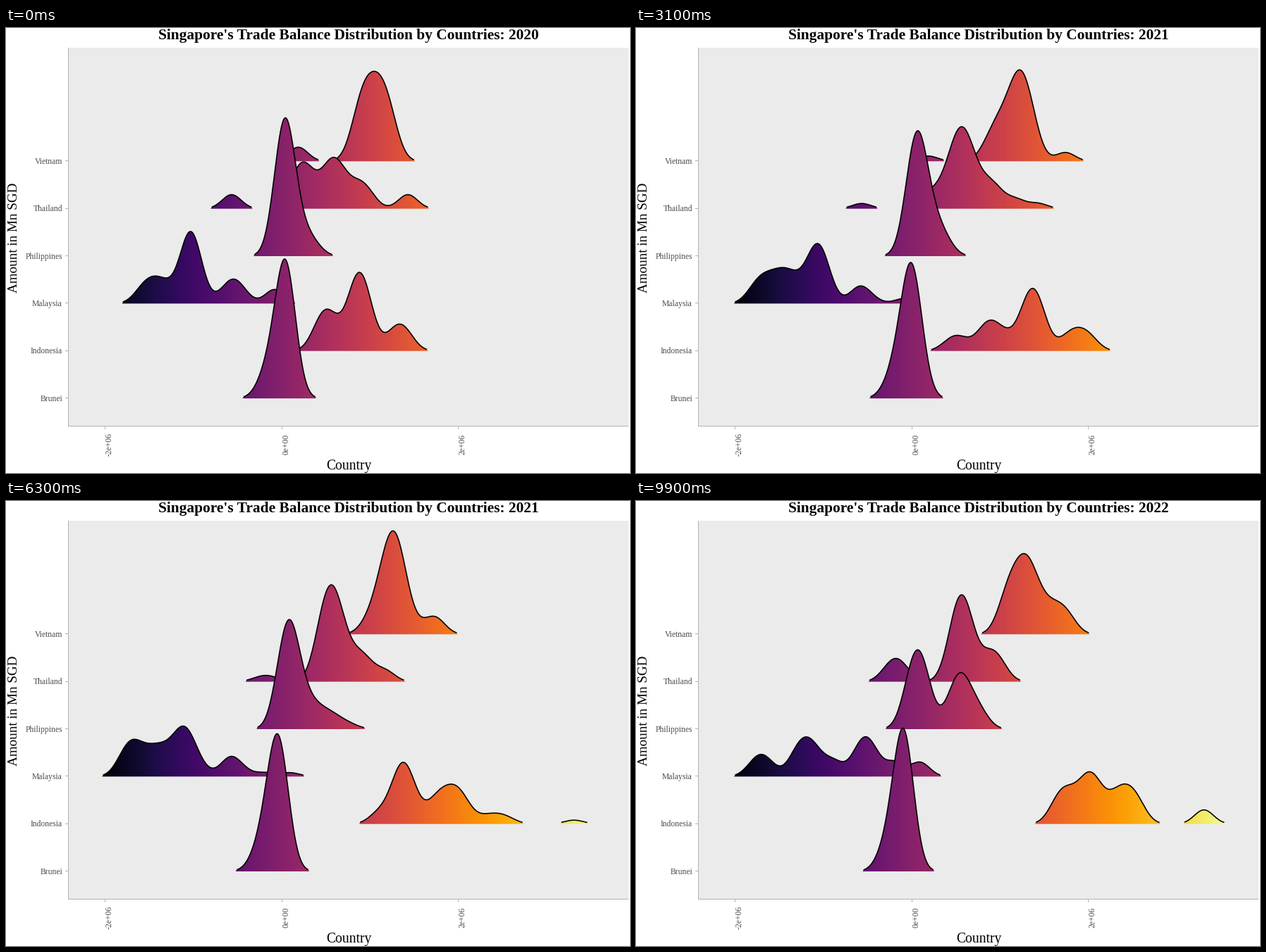
Write a matplotlib script that moves like this. It is 885 px wide and 632 px high and loops after 10 s.

```python
import numpy as np
import matplotlib.pyplot as plt
from matplotlib.animation import FuncAnimation
from matplotlib.patches import Rectangle
from matplotlib.path import Path

W, H, DPI = 885, 632, 100
FRAMES, INTERVAL = 100, 100
LEFT, RIGHT, TOP, BOTTOM = 89, 883, 28, 565
X0, X1 = 125, 847            # range of the density grid
BASE, STEP = 189.3, 67.35    # first baseline and row distance
SIGMA, UNIT = 13.6, 20       # kernel width, height of one observation
SPREAD = 13                  # usual half width of a cluster
CUT = 2.02                   # lower heights are trimmed away
GREY, TEXT = "#b3b3b3", "#4d4d4d"

grid = np.linspace(X0, X1, 512)


def cluster(x, n=1, r=None):
    """Kernel density of n observations spread evenly over x - r to x + r."""
    if r is None:
        r = SPREAD if n > 1 else 0
    centres = x + .5 + np.linspace(-r, r, 7)[:, None]
    return UNIT * n * np.exp(-0.5 * ((grid - centres) / SIGMA) ** 2).mean(axis=0)


def year(*clusters):
    return sum(cluster(*c) for c in clusters)


# Densities for 2020, 2021 and 2022
countries = {
    "Vietnam": [
        year((414,), (521.5, 10.9, 24)),
        year((521, 1.7), (549.5, 9.2), (608.5,)),
        year((541, 6.9, 20), (583, 5.2, 31))],
    "Thailand": [
        year((319.5,), (420, 3.9), (464, 4.2), (503, 2.2), (569.5,)),
        year((460, 9.3, 16), (501, 2.3), (538,)),
        year((368, 2), (461, 7.4), (505.5, 2.6))],
    "Philippines": [
        year((395, 10.3, 8), (425.5, 1.8)),
        year((400, 9, 10), (428, 2.8)),
        year((399, 6.8), (459, 4.7), (488,))],
    "Malaysia": [
        year((210, 2.9, 20), (261.5, 5.7, 10), (322, 2.1), (380.5,)),
        year((177, 3.3), (212, 3), (253.5, 4.7), (316,)),
        year((177, 1.9), (240.5, 3.8, 17), (280,), (325, 3.4), (367,), (402.5,))],
    "Indonesia": [
        year((453.5, 3.5), (501, 6.7), (558, 2.3)),
        year((527.5,), (563, 7.2), (627, 4, 20)),
        year((606, 2.9), (644, 4.2), (694, 4.2, 20), (805,))],
    "Brunei": [
        year((397 - 8.5 * k, 8.4, 5), (379 - 7 * k, 3.5, 15)) for k in range(3)],
}


def pt(px):
    return px * 72 / DPI


fig = plt.figure(figsize=(W / DPI, H / DPI), dpi=DPI, facecolor="white")
ax = fig.add_axes([0, 0, 1, 1])


def label(x, y, s, px, **kw):
    kw = {"ha": "center", "color": "black", **kw}
    return ax.text(x, y, s, fontsize=pt(px), family="Liberation Serif",
                   va="baseline", rotation_mode="anchor", **kw)


def bar(x, y, w, h, color):
    ax.add_patch(Rectangle((x, y), w, h, fc=color, lw=0, zorder=0))


class Ridge:
    def __init__(self, base, states, order):
        self.base, self.states = base, states
        self.image = ax.imshow(np.linspace(0, 1, X1 - X0)[None], cmap="inferno",
                               extent=(X0, X1, base + 1, base - 206), aspect="auto",
                               interpolation="nearest", zorder=order)
        self.line, = ax.plot([], [], color="black", lw=pt(1.6), zorder=order + .5,
                             solid_capstyle="butt", solid_joinstyle="round")

    def update(self, t):
        i = min(int(t), 1)
        h = self.states[i] + (self.states[i + 1] - self.states[i]) * (t - i)
        shown = h >= CUT
        self.line.set_data(grid, np.where(shown, self.base - h, np.nan))
        top = np.column_stack([grid, self.base - np.where(shown, h, 0)])
        outline = np.vstack([[X0, self.base], top, [X1, self.base]])
        self.image.set_clip_path(Path(outline), ax.transData)


bar(LEFT, TOP, RIGHT - LEFT, BOTTOM - TOP, "#ebebeb")
bar(LEFT - 1, TOP, 1, BOTTOM - TOP + 1, GREY)
bar(LEFT - 1, BOTTOM, RIGHT - LEFT + 1, 1, GREY)

ridges = []
for n, (name, states) in enumerate(countries.items()):
    base = BASE + STEP * n
    bar(84, int(base - .5), 4, 1, GREY)
    label(80, base + 3.7, name, 11.6, ha="right", color=TEXT)
    ridges.append(Ridge(base, states, n + 2))

for x, s in ((140, "-2e+06"), (391, "0e+00"), (641, "2e+06")):
    bar(x, BOTTOM + 1, 1, 4, GREY)
    label(x + 9.5, 591.5, s, 11.6, rotation=90, color=TEXT)

title = label(485.5, 16, "", 21.35, weight="bold")
label(486, 627, "Country", 19.6)
label(16, 297.5, "Amount in Mn SGD", 19.2, rotation=90)

ax.set_xlim(0, W)
ax.set_ylim(H, 0)
ax.axis("off")


def update(frame):
    t = 2 * frame / (FRAMES - 1)
    title.set_text("Singapore's Trade Balance Distribution by Countries: "
                   f"{2020 + round(t)}")
    for ridge in ridges:
        ridge.update(t)
    return []


anim = FuncAnimation(fig, update, frames=FRAMES, interval=INTERVAL,
                     repeat=True, repeat_delay=0)
plt.show()
```
